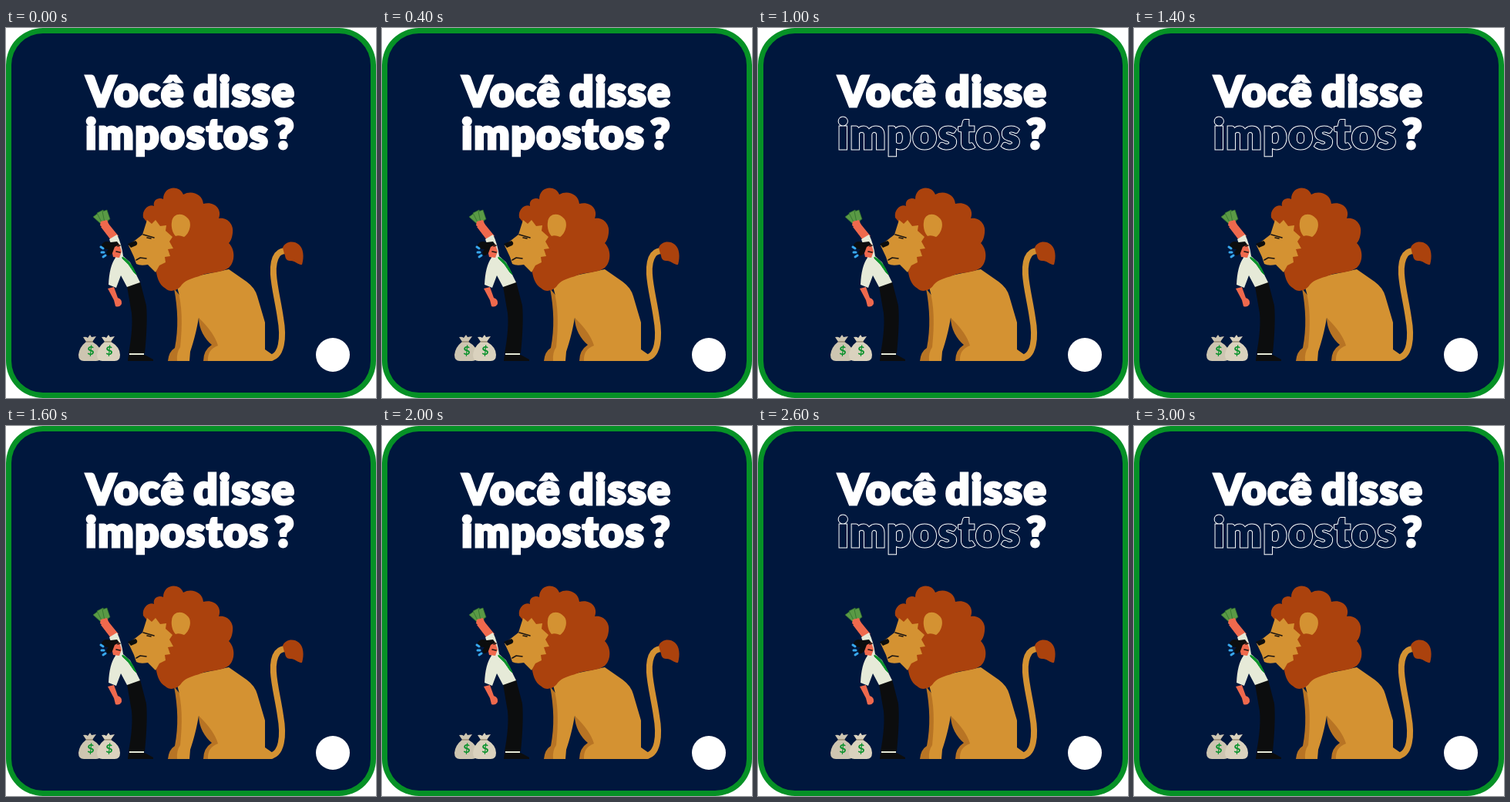
Recreate the animation shown at these times as an HTML page. Size 480 by 480 pixels, loop 3.2 s.

```html
<!DOCTYPE html>
<html lang="pt">
<head>
<meta charset="utf-8">
<title>Você disse impostos?</title>
<style>
html, body { margin: 0; width: 100%; height: 100%; overflow: hidden; background: #fff; }
svg { display: block; width: 100vw; height: 100vh; }
.title { font: 900 54.5px Lato, sans-serif; letter-spacing: 1.7px; word-spacing: -3px; stroke-linejoin: miter; }
.bold, .rim { fill: #fff; stroke: #fff; stroke-width: 3; }
.hollow { fill: #00173d; stroke: #00173d; stroke-width: 1; }
.full { animation: blink 400ms step-end infinite; }
.outline { animation: blink 400ms -200ms step-end infinite; }
@keyframes blink { 0% { opacity: 1; } 50%, 100% { opacity: 0; } }
.dollar { font: 700 16px Lato, sans-serif; fill: #07912a; text-anchor: middle; }
.mane { fill: #ab420d; }
.fur { fill: #d49232; }
.shade { fill: #b87424; }
.skin { fill: #ef694d; }
.shirt { fill: #e6ead8; }
.black { fill: #0c0d0e; }
.line { fill: none; stroke: #1b1512; stroke-width: 1.6; stroke-linecap: round; }
</style>
</head>
<body>
<svg viewBox="0 0 480 480">
  <defs>
    <g id="bag">
      <path d="M-5-25L-9-31Q-5-32-3-30L0-34L2-31L8-32L3-25Q15-18 15-8Q15 0 8 0H-8Q-15 0-15-8Q-14-18-5-25Z"/>
      <path d="M-5-25H4" stroke="#8e8065" stroke-width="1.2"/>
      <text class="dollar" x="1" y="-8">$</text>
    </g>
  </defs>

  <rect width="480" height="480" rx="48" fill="#069126"/>
  <rect x="7" y="7" width="466" height="466" rx="41" fill="#00173d"/>

  <g class="title">
    <text class="bold" x="104" y="102">Você disse</text>
    <text class="bold" x="348" y="157">?</text>
    <text class="bold full" x="103" y="157">impostos</text>
    <g class="outline">
      <text class="rim" x="103" y="157">impostos</text>
      <text class="hollow" x="103" y="157">impostos</text>
    </g>
  </g>

  <!-- lion -->
  <path d="M338 428C360 430 360 398 356 376C352 346 340 310 352 294Q357 288 367 289" fill="none" stroke="#d49232" stroke-width="8"/>
  <path class="mane" d="M359 285C362 277 373 275 380 281C386 286 387 297 384 307C378 307 374 301 368 302C361 301 363 295 361 293Z"/>
  <path class="shade" d="M218 338C223 364 224 390 219 415Q211 420 210 432H228L236 360Z"/>
  <path class="shade" d="M250 376C250 390 258 404 267 411Q256 418 256 432H290L275 390Z"/>
  <path class="fur" d="M222 336L232 325L289 313L312 329Q323 337 326 348L336 382V417L346 424Q350 432 344 432H262Q261 417 275 412Q270 395 250 376C247 393 244 405 239 420L238 432H222Q221 421 226 414C229 385 229 360 222 336Z"/>
  <path class="mane" d="M178 246C176 234 187 228 192 231C190 222 199 219 204 222C204 205 225 203 230 216C240 210 255 215 256 228C270 224 281 235 276 247C288 245 296 256 294 266C293 274 291 277 289 279C298 288 297 304 289 311C278 319 263 316 253 321C242 325 234 326 228 333C224 340 213 344 207 338C198 333 195 322 194 309L188 258Z"/>
  <path class="fur" d="M183 249L189 254L194 249L200 257L208 256L207 263L216 271L212 277L217 286L210 287L213 296L206 297L207 304L199 308L194 317L184 307Q174 309 169 306L166 297L159 282L177 268Z"/>
  <path class="fur" d="M215 252C216 240 229 239 236 247C242 253 238 267 231 271Q224 268 220 270C216 266 214 258 215 252Z"/>
  <path class="black" d="M158 280L168 276Q172 279 169 282L162 285Z"/>
  <path class="line" d="M169 301L174 298L182 299M178 268L192 272M183 272L188 273"/>

  <!-- man -->
  <path class="black" d="M157 335L174 329L182 360Q184 381 180 422H159Q165 390 163 370Z"/>
  <path class="shirt" d="M160 422H179V425H160Z"/>
  <path class="black" d="M159 424H180L191 430V432H158Z"/>
  <path class="skin" d="M123 258L133 254L146 270L136 275Z"/>
  <g fill="#5a9a45" stroke="#2b6b2c" stroke-width=".7">
    <path d="M113 245L121 239L131 250L124 255Z"/>
    <path d="M118 240L126 236L133 250L125 254Z"/>
    <path d="M125 238L131 236L135 248L128 252Z"/>
  </g>
  <path class="skin" d="M122 256L123 251L131 249L134 256L128 261Z"/>
  <path class="shirt" d="M134 274L144 268Q150 280 152 296L161 304L169 320L174 330L157 336L149 321L143 337L133 333Q134 309 142 298Z"/>
  <path class="skin" d="M132 338L140 336L145 350Q151 352 150 358Q147 363 142 361L140 353Z"/>
  <path d="M151 297Q162 302 169 320L166 317Q159 305 151 299Z" fill="#079128" stroke="#079128"/>
  <path class="skin" d="M136 284L147 280L150 290L147 298L139 297Z"/>
  <path class="black" d="M125 280Q128 275 136 278L144 277L147 281L141 284L138 292Q132 299 130 291L133 287Q125 287 124 281Z"/>
  <path class="line" d="M143 290L148 291M145 283L148 282" stroke-width="1"/>
  <path d="M123 284L126 286M124 291L127 291M126 297L129 295" stroke="#38a8ee" stroke-width="3" stroke-linecap="round"/>

  <use href="#bag" x="109" y="432" fill="#cdc5b1"/>
  <use href="#bag" x="133" y="432" fill="#dad2be"/>

  <circle cx="424" cy="424" r="22" fill="#fff"/>
</svg>
</body>
</html>
```
